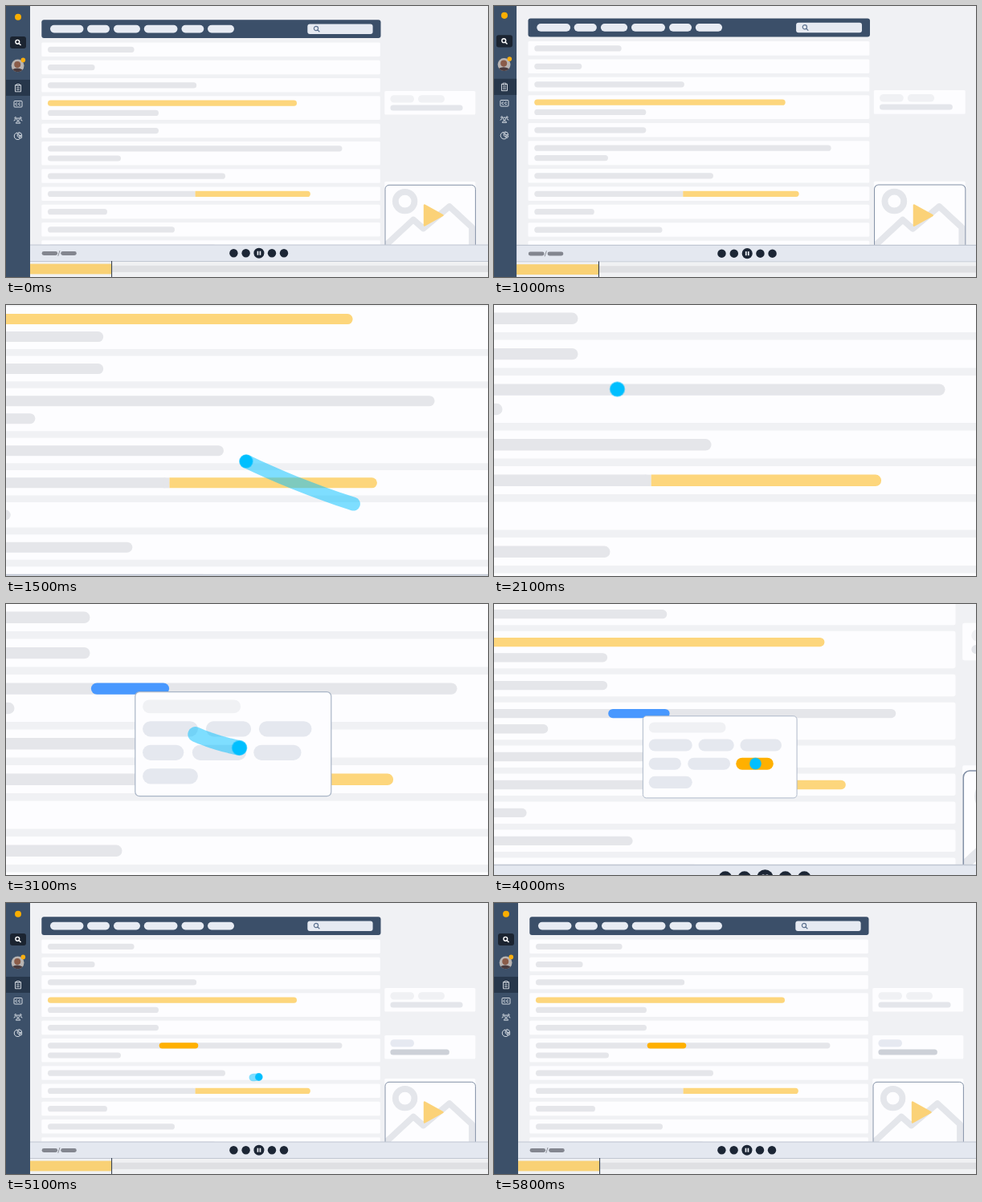
Write an HTML page that moves like this. It is 600 px wide and 338 px high and loops after 7 s.

```html
<!DOCTYPE html>
<html lang="en">
<head>
<meta charset="utf-8">
<title>Transcript highlight</title>
<style>
  html, body { margin: 0; width: 100%; height: 100%; overflow: hidden; background: #f0f1f4; }
  svg { display: block; width: 100vw; height: 100vh; }
</style>
</head>
<body>
<svg id="stage" viewBox="0 0 600 338">
  <defs>
    <clipPath id="avatarClip"><circle cx="14.6" cy="74.4" r="7.9"/></clipPath>
    <clipPath id="imageClip"><rect x="472" y="223.3" width="112.4" height="90" rx="5"/></clipPath>
  </defs>
  <rect width="600" height="338" fill="#f0f1f4"/>
  <g id="camera">
    <g id="page"></g>

    <g id="image">
      <rect x="471.3" y="219" width="113" height="85" rx="1.5" fill="#fdfdff"/>
      <rect x="472" y="223.3" width="112.4" height="90" rx="5" fill="#fdfdff"/>
      <g clip-path="url(#imageClip)" fill="none" stroke="#e4e6eb" stroke-width="7.8">
        <circle cx="496.6" cy="243.6" r="11.8"/>
        <path d="M470 301L507 266.5L519.5 277.5L552 250L580 276V302" stroke-linejoin="round"/>
      </g>
      <path d="M521 248.5V273.5L543.5 261Z" fill="#fbd278" stroke="#fbd278" stroke-width="2.4" stroke-linejoin="round"/>
      <rect x="472" y="223.3" width="112.4" height="90" rx="5" fill="none" stroke="#8290a6"/>
    </g>

    <g id="player">
      <rect x="30" y="298" width="570" height="20.5" fill="#e4e8f0"/>
      <path d="M30 298H600M30 318.5H600" stroke="#c0c6d2"/>
      <path d="M64.8 311.8L67 305" stroke="#83868f" stroke-width=".9"/>
      <rect x="30" y="319" width="570" height="19" fill="#f0f1f3"/>
      <rect x="132" y="323.7" width="468" height="8.2" fill="#dfe0e3"/>
      <rect x="30" y="321.6" width="101.3" height="12.8" fill="#f9d175"/>
      <path d="M131.6 318V338" stroke="#2b3645"/>
    </g>

    <g id="sidebar">
      <rect width="30" height="338" fill="#3c5069"/>
      <circle cx="15" cy="13.7" r="4" fill="#fbae00"/>
      <rect x="5" y="38" width="20" height="15" rx="3" fill="#1b2431"/>
      <g fill="none" stroke="#fff" stroke-width="1.4">
        <circle cx="14.3" cy="44.8" r="2.4"/><path d="M16 46.5L18.5 49"/>
      </g>
      <g clip-path="url(#avatarClip)">
        <rect x="6" y="66" width="18" height="18" fill="#b9b4b2"/>
        <circle cx="14.2" cy="73" r="4" fill="#8a5c49"/>
        <ellipse cx="14" cy="83" rx="8" ry="5.5" fill="#4a3b3e"/>
      </g>
      <circle cx="21.3" cy="67.4" r="2.8" fill="#fbae10"/>
      <rect y="92" width="30" height="20" fill="#27374b"/>
      <g fill="none" stroke="#e6eaf0" stroke-width=".9">
        <path d="M13 98.5H11.5V106.8H18.5V98.5H17M13.2 97.5H16.8V99.5H13.2ZM13 102H17M13 104.3H17"/>
        <rect x="10" y="118.5" width="10" height="7.5" rx=".8"/>
        <path d="M14.2 121.2A1.4 1.4 0 1 0 14.2 123.3M17.9 121.2A1.4 1.4 0 1 0 17.9 123.3"/>
        <circle cx="15" cy="141.4" r="1.6"/><circle cx="11.8" cy="139.6" r="1"/><circle cx="18.2" cy="139.6" r="1"/>
        <path d="M12.4 146.2C12.4 143.4 17.6 143.4 17.6 146.2ZM10 143.4Q10 141.7 12 141.8M20 143.4Q20 141.7 18 141.8"/>
        <path d="M14.2 158A4.3 4.3 0 1 0 17.6 165.3L14.2 162.3ZM15.8 157.5A4.2 4.2 0 0 1 19.8 161.4H15.8ZM16.5 162.7H19.8Q19.6 164.3 18.6 165.2Z"/>
      </g>
    </g>

    <g id="popup" transform="translate(217.9 179.6)">
      <rect x=".25" y=".25" width="122" height="65" rx="2.7" fill="#fdfdff" stroke="#a9b5c6" stroke-width=".6"/>
    </g>
    <g id="cursor" fill="#00bfff">
      <path id="trail" fill="none" stroke="#00bfff" stroke-opacity=".5" stroke-width="9.4" stroke-linecap="round" stroke-linejoin="round"/>
      <circle id="halo" r="4.9" fill-opacity=".5"/>
      <circle id="dot" r="4.4"/>
    </g>
  </g>
</svg>
<script>
const LOOP = 7000, STEP = 100, TRAIL = 100;
const FOCUS = { x: 275.5, y: 250 };
const GRAY = '#e5e6ea', YELLOW = '#fdd67c', BLUE = '#4898ff', ORANGE = '#ffb000';
const PILL = '#e5e8ef', PALE = '#f0f1f4', PAPER = '#fdfdff';
const $ = id => document.getElementById(id);

function add(parent, tag, attrs) {
  const node = document.createElementNS('http://www.w3.org/2000/svg', tag);
  for (const key in attrs) node.setAttribute(key, attrs[key]);
  return parent.appendChild(node);
}
const box = (parent, x, y, width, height, rx, fill) =>
  add(parent, 'rect', { x, y, width, height, rx, fill });
const pill = (parent, x, y, width, height, fill) =>
  box(parent, x, y, width, height, height / 2, fill);

// Header with menu and search field
const page = $('page');
box(page, 44.3, 17.3, 422.2, 22.8, 3, '#3b4f69');
[[55, 41.5], [101, 28], [134, 33], [171.8, 41.7], [218.5, 27.8], [251, 33]]
  .forEach(([x, w]) => pill(page, x, 23.8, w, 9.6, '#e7ebf3'));
box(page, 375.3, 22.6, 81.3, 12.3, 3, '#e6eaf2');
add(page, 'path', {
  d: 'M388.6 28A2.6 2.6 0 1 1 383.4 28A2.6 2.6 0 1 1 388.6 28M388 30L390.4 32.3',
  fill: 'none', stroke: '#5d7290', 'stroke-width': 1.2
});

// Transcript: each row lists the right ends of its lines
const rows = [[159.6], [110.6], [237.2], [362, 190], [190], [418.5, 143], [273], [235.6], [126], [210], [262]];
const LEFT = 52;
let rowTop = 45.6, word;
rows.forEach((ends, i) => {
  const height = ends.length > 1 ? 29.6 : 17.5;
  box(page, 44.3, rowTop, 421.5, height, 1.5, PAPER);
  ends.forEach((end, line) => {
    const y = rowTop + 5.25 + line * 12.2;
    const fill = i === 3 && line === 0 ? YELLOW : GRAY;
    pill(page, LEFT, y, end - LEFT, 7.2, fill);
    if (i === 5 && line === 0) word = pill(page, 190.7, y, 48.6, 7.2, BLUE);
    if (i === 7) {
      box(page, end - 4, y, 4, 7.2, 0, GRAY);
      add(page, 'path', { d: `M${end} ${y}H375.2a3.6 3.6 0 0 1 0 7.2H${end}Z`, fill: YELLOW });
    }
  });
  rowTop += height + 4.75;
});

// Note cards on the right
function noteCard(y, barWidth, pills, pillFill, barFill) {
  const card = add(page, 'g', {});
  box(card, 471.3, y, 113, 29.6, 1.5, PAPER);
  pills.forEach(([x, w]) => pill(card, x, y + 5.2, w, 9.4, pillFill));
  pill(card, 478.4, y + 17.4, barWidth, 7.1, barFill);
  return card;
}
noteCard(106, 90.2, [[478.4, 29.6], [513, 33]], PALE, '#e4e6eb');
const newCard = noteCard(165, 73.5, [[478.4, 29.6]], '#e6e9f1', '#cdd1d8');

// Player controls
const player = $('player');
[44.6, 68.2].forEach(x => pill(player, x, 306, 19.6, 4.9, '#83868f'));
[283.4, 298.6, 314.9, 331, 346].forEach((cx, i) =>
  add(player, 'circle', { cx, cy: 308.2, r: i === 2 ? 6.5 : 5.2, fill: '#1c2635' }));
[312.6, 315.6].forEach(x => box(player, x, 305.7, 1.7, 5, 0, '#f0f3f8'));

// Popup options
const popup = $('popup');
pill(popup, 4.9, 5.1, 61, 8.4, PALE);
const options = [[4.9, 0, 34.4], [44.3, 0, 28.1], [77.3, 0, 32.8], [4.9, 1, 25.6], [35.8, 1, 33.6], [74, 1, 29.6], [4.9, 2, 34.4]]
  .map(([x, row, w]) => pill(popup, x, 18.5 + row * 14.75, w, 9.6, PILL));
const choice = options[5];

const clamp = v => Math.min(1, Math.max(0, v));
const ramp = (t, start, length) => clamp((t - start) / length);
const ease = p => p < .5 ? 2 * p * p : 1 - 2 * (1 - p) ** 2;

// Cursor trips: quadratic curves from, via, to
const trips = [
  { start: 950, length: 800, pts: [[626, 270], [400, 300], [214.5, 177.5]] },
  { start: 2700, length: 600, pts: [[214.5, 177.5], [250.3, 215], [307.3, 217.6]] },
  { start: 5025, length: 700, pts: [[307.3, 217.6], [470, 205], [615, 137]] }
];
function cursorAt(t) {
  const trip = trips.filter(item => t >= item.start).pop() || trips[0];
  const u = ease(ramp(t, trip.start, trip.length)), v = 1 - u;
  const [a, b, c] = trip.pts;
  return [0, 1].map(k => v * v * a[k] + 2 * u * v * b[k] + u * u * c[k]);
}

function render(t) {
  const zoom = ease(ramp(t, 950, 800)) - ease(ramp(t, 3625, 810));
  $('camera').setAttribute('transform',
    `translate(${-zoom * FOCUS.x} ${-zoom * FOCUS.y}) scale(${1 + zoom})`);

  word.setAttribute('opacity', t >= 2600 ? 1 : 0);
  word.setAttribute('fill', t >= 4200 ? ORANGE : BLUE);
  choice.setAttribute('fill', t >= 3300 ? ORANGE : PILL);
  popup.setAttribute('opacity', ramp(t, 2550, 200) - ramp(t, 4450, 200));
  newCard.setAttribute('opacity', ramp(t, 4600, 300));

  const [x, y] = cursorAt(t);
  const path = [];
  for (let i = 0; i <= 8; i++) path.push(cursorAt(t - TRAIL * i / 8).join(' '));
  const moving = path[0] !== path[8];
  $('trail').setAttribute('d', moving ? 'M' + path.join('L') : '');
  for (const id of ['halo', 'dot']) $(id).setAttribute('transform', `translate(${x} ${y})`);
  $('cursor').setAttribute('visibility', t >= 950 && t < 5800 ? 'visible' : 'hidden');
}

const begin = performance.now();
function tick() {
  const t = (performance.now() - begin) % LOOP;
  render(Math.floor(t / STEP) * STEP);
  requestAnimationFrame(tick);
}
tick();
</script>
</body>
</html>
```
